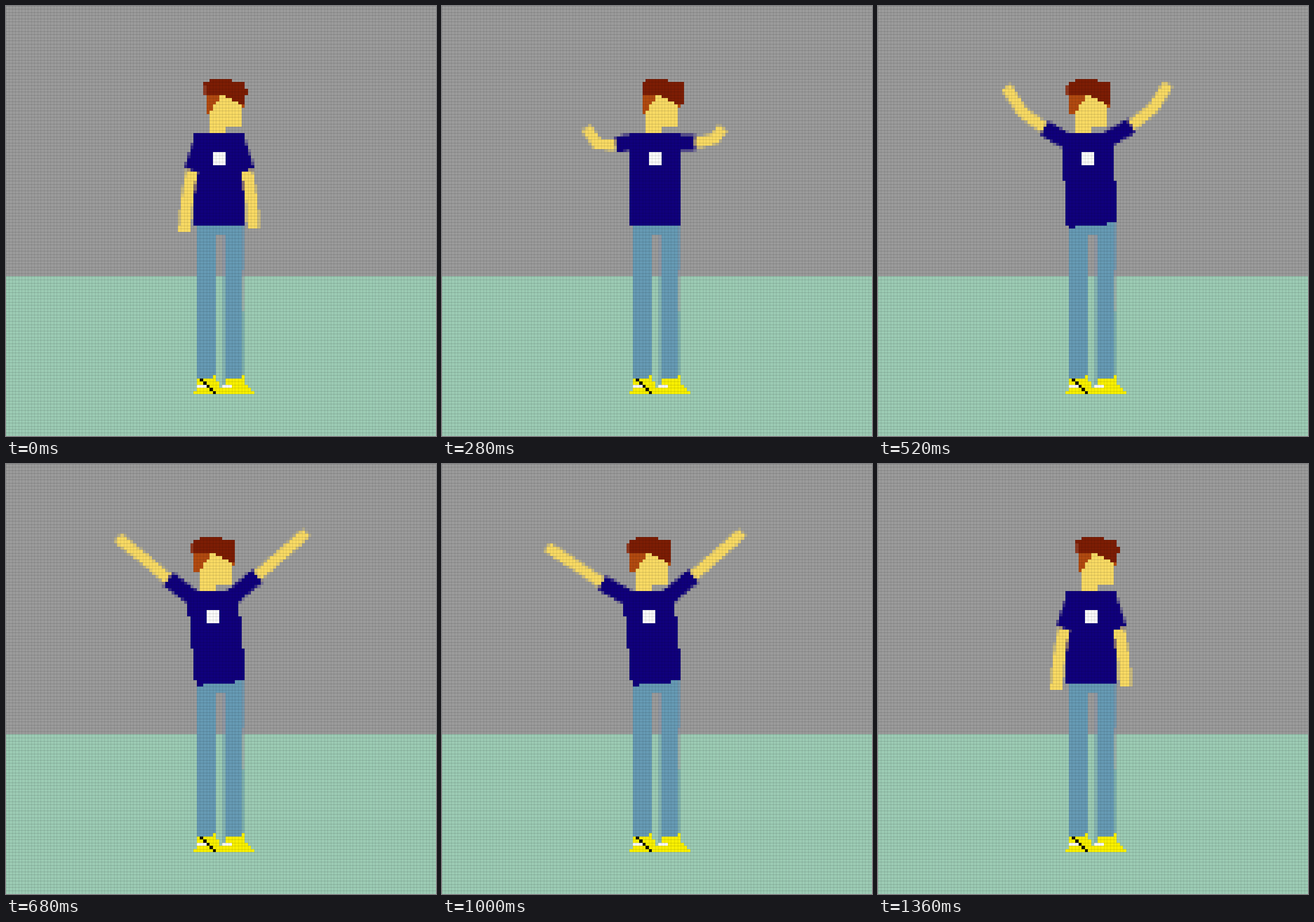
Animation, 748 px wide and 748 px high, one loop 2 s. Source, as an HTML page with a canvas:

```html
<!DOCTYPE html>
<html lang="en">
<head>
<meta charset="utf-8">
<title>Pixel cheer</title>
<style>
  html, body { margin: 0; width: 100%; height: 100%; overflow: hidden; background: #9b9b9b; }
  canvas { display: block; width: 100vw; height: 100vh; }
</style>
</head>
<body>
<canvas id="stage" width="748" height="748"></canvas>
<script>
const SIZE = 748, CELLS = 135, CELL = SIZE / CELLS;
const LOOP = 2000, STEP = 40;
const SLEEVE = 28;
const ctx = document.getElementById('stage').getContext('2d');

const C = {
  wall: '#9b9b9b', floor: '#9ccbb4', skin: '#f8da64', shirt: '#10007c',
  jeans: '#669ab4', hair: '#7c1d04', fringe: '#b24a10', shoe: '#f8f000',
  white: '#fafafa', black: '#141404'
};

// Per arm: shoulder, sleeve end, elbow, hand. Then forearm width, openness, lean.
const rest = [341,235, 324,287, 316,335, 310,393,  402,235, 419,287, 427,335, 431,388,  21, 0, 0];
const wide = [335,238, 307,252, 275,268, 237,263,  408,238, 435,249, 468,257, 501,264,  18, 1, 0];
const bent = [330,236, 299,231, 267,214, 266,160,  405,236, 447,228, 478,208, 478,161,  20, 1, 0];
const high = [330,236, 282,200, 240,164, 195,128,  392,233, 438,195, 481,157, 523,120,  19, 1, 1];
const low  = [330,236, 278,207, 230,175, 183,145,  392,233, 438,195, 481,157, 523,120,  19, 1, 1];

const keys = [
  [0, rest], [40, rest], [160, wide], [400, bent], [600, high],
  [640, high], [1040, low], [1200, low], [1280, wide], [1360, rest], [LOOP, rest]
];

function poseAt(t) {
  const i = keys.findIndex(k => k[0] > t);
  const [t0, a] = keys[i - 1], [t1, b] = keys[i];
  let u = (t - t0) / (t1 - t0);
  if (a === high) u = u * u * (3 - 2 * u);
  return a.map((v, n) => v + (b[n] - v) * u);
}

const px = n => Math.floor(n * CELL + 1e-6);

function block(color, x, y, w, h) {
  ctx.fillStyle = color;
  ctx.fillRect(px(x), px(y), px(x + w) - px(x), px(y + h) - px(y));
}

// A row of cells from column a up to, not including, column b.
const row = (color, y, a, b, h = 1) => block(color, a, y, b - a, h);

// A thick line on the cell grid; partly covered cells are translucent.
function limb(color, width, pts) {
  const path = new Path2D();
  const xs = [], ys = [];
  for (let i = 0; i < pts.length; i += 2) {
    path.lineTo(pts[i], pts[i + 1]);
    xs.push(pts[i]);
    ys.push(pts[i + 1]);
  }
  ctx.lineWidth = width;
  ctx.lineJoin = 'round';
  const from = v => Math.floor((Math.min(...v) - width) / CELL);
  const to = v => Math.ceil((Math.max(...v) + width) / CELL);
  const hit = (x, y) => ctx.isPointInStroke(path, x * CELL, y * CELL) ? .25 : 0;
  for (let y = from(ys); y < to(ys); y++)
    for (let x = from(xs); x < to(xs); x++) {
      const cover = hit(x + .25, y + .25) + hit(x + .75, y + .25) +
                    hit(x + .25, y + .75) + hit(x + .75, y + .75);
      if (!cover) continue;
      ctx.globalAlpha = cover;
      block(color, x, y, 1, 1);
    }
  ctx.globalAlpha = 1;
}

function drawLegs() {
  block(C.jeans, 60, 69, 6, 48);
  block(C.jeans, 66, 68, 3, 4);
  block(C.jeans, 69, 68, 5, 49);
  // soft edges of the right leg
  block('#9197a2', 68, 72, 1, 13);
  block('#85b4b2', 68, 85, 1, 34);
  block('#7598ad', 74, 68, 1, 15);
  block('#9297a0', 74, 83, 1, 2);
  block('#9ab0aa', 74, 85, 1, 11);
  block('#7fb1ae', 74, 96, 1, 20);
}

function drawShoes() {
  row(C.shoe, 116, 65, 66);
  row(C.shoe, 117, 60, 66);
  row(C.shoe, 118, 60, 67, 2);
  row(C.shoe, 120, 60, 77);
  row(C.shoe, 121, 59, 78);
  row(C.shoe, 116, 74, 75);
  row(C.shoe, 117, 69, 75, 2);
  row(C.shoe, 119, 69, 76);
  row(C.white, 119, 60, 63);
  row(C.white, 119, 68, 71);
  for (let i = 0; i < 5; i++) block(C.black, 61 + i, 117 + i, 1, 1);
}

function drawTorso(lean) {
  const tilted = lean > .5;
  const shift = y => Math.round(-lean * (63 - y) / 10);
  for (let y = 40; y < 69; y++)
    row(C.shirt, y, 59 + shift(y), tilted && y === 68 ? 72 : 75 + shift(y));
  if (tilted) row(C.shirt, 69, 60, 62);
  block(C.white, 65 + shift(46), 46, 4, 4);
}

function drawHead(open, lean) {
  const dx = Math.round(-3 * lean);
  const r = (color, y, a, b, h) => row(color, y, a + dx, b + dx, h);
  const tilted = lean > .5, up = open > .5;
  const left = tilted ? 61 : up ? 63 : 62;
  const edge = tilted ? 62 : 63;
  const right = up && !tilted ? 76 : 75;

  r(C.skin, 28, 64, 74, 10);
  r(C.skin, 38, 64, 69, 2);

  r(C.hair, 23, 64, 71);
  r(C.hair, 24, Math.max(left, 62), right);
  r(C.hair, 25, left, right);
  r(C.hair, 26, left, tilted ? 75 : 76, 2);
  if (left < edge) r('#8f3a22', 25, left, edge, 3);

  // fringe on the left, parting on the right
  [67, 67, 66, 65, 65, 64].forEach((end, i) => r(C.fringe, 28 + i, edge, end));
  [69, 71, 73].forEach((start, i) => r(C.hair, 28 + i, start, right));
  r(C.fringe, 31, 74, 75);
}

function drawGrid() {
  for (let i = 0; i < CELLS; i++) {
    ctx.fillStyle = 'rgba(0,0,0,.09)';
    ctx.fillRect(px(i), 0, 1, SIZE);
    ctx.fillStyle = 'rgba(0,0,0,.13)';
    ctx.fillRect(0, px(i), SIZE, 1);
  }
}

function draw(t) {
  const pose = poseAt(t);
  const [width, open, lean] = pose.slice(16);
  block(C.wall, 0, 0, CELLS, 85);
  block(C.floor, 0, 85, CELLS, 50);
  drawLegs();
  drawShoes();
  drawTorso(lean);
  drawHead(open, lean);
  for (const side of [0, 8]) {
    limb(C.shirt, SLEEVE, pose.slice(side, side + 4));
    limb(C.skin, width, pose.slice(side + 2, side + 8));
  }
  drawGrid();
}

const start = performance.now();
let shown = -1;
function tick() {
  const t = Math.floor((performance.now() - start) % LOOP / STEP) * STEP;
  if (t !== shown) draw(shown = t);
  requestAnimationFrame(tick);
}
tick();
</script>
</body>
</html>
```
